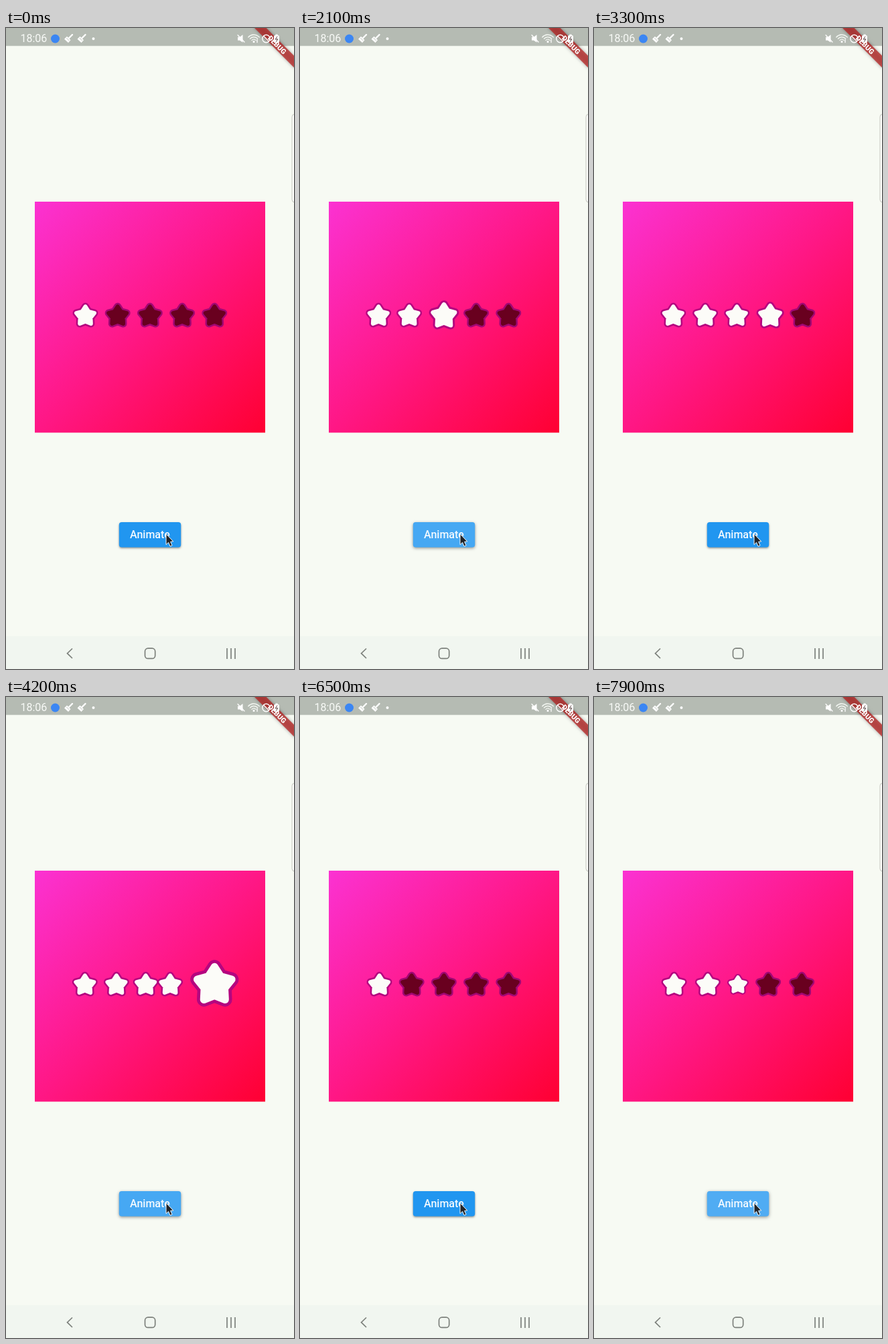
Animation, 430 px wide and 956 px high, one loop 8 s. Source, as an HTML page with a canvas:

```html
<!DOCTYPE html>
<html lang="en">
<head>
<meta charset="utf-8">
<title>Star rating</title>
<style>
html, body { margin: 0; width: 100%; height: 100%; overflow: hidden; background: #f7faf3; }
canvas { display: block; width: 430px; height: 956px; }
</style>
</head>
<body>
<canvas id="stage" width="430" height="956"></canvas>
<script>
const ctx = document.getElementById('stage').getContext('2d');
const W = 430, H = 956, LOOP = 8000, STEP = 100;
const FONT = 'Roboto, sans-serif';

// [time of press, new rating]
const presses = [[700, 2], [1700, 3], [2600, 4], [3800, 5], [5600, 1], [6700, 2], [7700, 3]];
const peaks = [1.1, 1.18, 1.18, 1.45, 1.9];
const ends = [600, 600, 600, 900, 1300];
const falloff = [0, 1, 0.35, 0.1, 0.04];

function tween(keys, t) {
  if (t <= keys[0][0]) return keys[0][1];
  for (let i = 1; i < keys.length; i++) {
    const [t0, a] = keys[i - 1], [t1, b] = keys[i];
    if (t < t1) {
      const k = (t - t0) / (t1 - t0);
      return a + (b - a) * k * k * (3 - 2 * k);
    }
  }
  return keys[keys.length - 1][1];
}

function popScale(rating, t) {
  const peak = peaks[rating - 1], end = ends[rating - 1];
  const dip = rating === 1 ? 0.85 : 0.65;
  return tween([[-100, 1], [100, dip], [200, Math.max(dip, 0.84)], [400, peak],
    [(400 + end) / 2, 1 + (peak - 1) * 0.2], [end, 1]], t);
}

function pushRight(rating, t) {
  const peak = (peaks[rating - 1] - 1) * 12;
  return tween([[-100, 0], [100, -6], [200, -3], [300, peak], [400, 0]], t);
}

function fillRect(x, y, w, h, color) {
  ctx.fillStyle = color;
  ctx.fillRect(x, y, w, h);
}

function roundRect(x, y, w, h, r) {
  ctx.beginPath();
  ctx.roundRect(x, y, w, h, r);
}

function poly(points, close) {
  ctx.beginPath();
  points.forEach(([x, y]) => ctx.lineTo(x, y));
  if (close) ctx.closePath();
}

function stroke(color, width) {
  ctx.strokeStyle = color;
  ctx.lineWidth = width;
  ctx.stroke();
}

function disc(x, y, r, color) {
  ctx.beginPath();
  ctx.arc(x, y, r, 0, Math.PI * 2);
  ctx.fillStyle = color;
  ctx.fill();
}

function text(str, x, y, font, color, align) {
  ctx.font = font + ' ' + FONT;
  ctx.fillStyle = color;
  ctx.textAlign = align;
  ctx.fillText(str, x, y);
}

function drawStar(x, scale, lit) {
  ctx.save();
  ctx.translate(x, 429.5);
  ctx.scale(scale, scale);
  ctx.lineJoin = 'round';
  const points = [];
  for (let i = 0; i < 10; i++) {
    const a = -Math.PI / 2 + i * Math.PI / 5, r = i % 2 ? 8.3 : 14.2;
    points.push([r * Math.cos(a), r * Math.sin(a)]);
  }
  poly(points, true);
  stroke(lit ? '#b4057f' : '#a00774', 11);
  stroke(lit ? '#fcfcf8' : '#69001f', 6);
  ctx.fillStyle = lit ? '#fcfcf8' : '#69001f';
  ctx.fill();
  ctx.restore();
}

function drawStars(rating, before, t) {
  const scale = popScale(rating, t), reset = rating === 1;
  const right = pushRight(rating, t);
  const shown = t >= 100 ? rating : before;
  const order = [1, 2, 3, 4, 5].filter(i => i !== rating).concat(rating);
  for (const i of order) {
    const d = i - rating;
    let x = 118.5 + (i - 1) * 48.2;
    if (!reset && d < 0) x -= (scale - 1) * 20 * falloff[-d];
    if (!reset && d > 0) x += right * falloff[d];
    drawStar(x, d === 0 || reset ? scale : 1, i <= shown);
  }
}

function drawPanel() {
  const g = ctx.createLinearGradient(43, 259, 387, 604);
  g.addColorStop(0, '#fb32d2');
  g.addColorStop(0.5, '#ff1785');
  g.addColorStop(1, '#ff0032');
  fillRect(43, 259, 344, 344.5, g);
}

function drawButton(t) {
  const glow = tween([[-100, 0], [100, 0.2], [200, 0.21], [400, 0.17], [600, 0]], t);
  ctx.save();
  ctx.shadowColor = 'rgba(0,0,0,.4)';
  ctx.shadowBlur = 3 + glow * 10;
  ctx.shadowOffsetY = 1.5;
  roundRect(168.8, 737, 92.4, 37.5, 4);
  ctx.fillStyle = '#2196f0';
  ctx.fill();
  ctx.restore();
  if (glow > 0) {
    ctx.save();
    roundRect(168.8, 737, 92.4, 37.5, 4);
    ctx.clip();
    disc(239, 755, 40 + Math.max(0, t) * 0.3, `rgba(255,255,255,${glow})`);
    ctx.restore();
  }
  text('Animate', 215, 761, '500 16px', '#f6fbff', 'center');
}

function drawCursor() {
  poly([[239, 754.5], [239, 770.5], [242.6, 767.2], [245, 773], [248, 771.8],
    [245.6, 766.2], [249.8, 765.8]], true);
  ctx.fillStyle = '#20242a';
  ctx.fill();
  ctx.lineJoin = 'miter';
  stroke('#f4f7fa', 1);
}

function drawBrush(x) {
  poly([[x + 6, 10], [x + 1, 15]]);
  stroke('#fff', 2.4);
  poly([[x - 2, 12.5], [x + 3.5, 18], [x, 22], [x - 6, 16.5]], true);
  ctx.fillStyle = '#fff';
  ctx.fill();
  poly([[x - 2.6, 15], [x + 1, 18.6]]);
  stroke('#b5bbb3', 0.9);
}

function drawStatusIcons() {
  ctx.lineCap = 'round';
  text('18:06', 21.5, 21.3, '400 16px', '#f8faf7', 'left');
  disc(73.5, 16, 6.5, '#3b86f3');
  drawBrush(93);
  drawBrush(112.5);
  disc(130.5, 16, 2, '#fff');

  // muted speaker
  poly([[346, 13.5], [349, 13.5], [353.5, 10], [353.5, 21.5], [349, 18.5], [346, 18.5]], true);
  ctx.fillStyle = '#fff';
  ctx.fill();
  poly([[346, 10.5], [356, 21]]);
  stroke('#fff', 1.3);

  // wireless arcs
  for (const r of [4, 7.5, 11]) {
    ctx.beginPath();
    ctx.arc(370, 21, r, -Math.PI * 0.77, -Math.PI * 0.23);
    stroke('#f3f6f1', 1.4);
  }
  disc(370, 20.5, 1.5, '#fff');
  poly([[375, 17.5], [375, 21.5]]);
  stroke('#fff', 1.3);

  // blocked sign
  ctx.beginPath();
  ctx.arc(388.5, 16, 5.7, 0, Math.PI * 2);
  stroke('#fff', 1.4);
  poly([[384.6, 12], [392.5, 20]]);
  stroke('#fff', 1.4);

  // battery
  roundRect(400, 11, 8, 11, 1.5);
  ctx.fillStyle = '#fff';
  ctx.fill();
  fillRect(402.3, 9.5, 3.4, 2, '#fff');
  poly([[404.8, 12.8], [402.2, 17], [405.8, 16.5], [403.5, 20.3]]);
  stroke('#5b4545', 1);
  ctx.lineCap = 'butt';
}

function drawBanner() {
  ctx.save();
  ctx.translate(W, 0);
  ctx.rotate(Math.PI / 4);
  ctx.shadowColor = 'rgba(0,0,0,.45)';
  ctx.shadowBlur = 5;
  fillRect(-43, 29.2, 86, 12.5, 'rgba(183,28,28,.72)');
  ctx.shadowBlur = 0;
  text('DEBUG', 0, 39.3, '900 10.6px', '#fff', 'center');
  ctx.restore();
}

function drawNav() {
  fillRect(0, 907, W, H - 907, '#f1f6f0');
  ctx.lineJoin = 'miter';
  poly([[99, 925.5], [91.5, 932.7], [99, 940]]);
  stroke('#7d817c', 1.7);
  roundRect(207.5, 925.2, 15.2, 15.2, 4.5);
  stroke('#7d817c', 1.7);
  for (const x of [330, 336, 342]) {
    poly([[x, 925], [x, 941]]);
    stroke('#7d817c', 1.7);
  }
}

function drawHandle() {
  roundRect(427, 128.5, 12, 131.5, 4);
  ctx.fillStyle = '#fcfdf9';
  ctx.fill();
  stroke('#c4c6bf', 1);
}

function render(time) {
  let rating = 1, before = 1, t = 5000;
  for (const [at, next] of presses) {
    if (time < at) break;
    before = rating;
    rating = next;
    t = time - at;
  }
  fillRect(0, 0, W, H, '#f7faf3');
  fillRect(0, 0, W, 26.7, '#b5bbb3');
  drawPanel();
  drawStars(rating, before, t);
  drawButton(t);
  drawCursor();
  drawHandle();
  drawNav();
  drawBanner();
  drawStatusIcons();
}

const start = performance.now();
function frame() {
  const time = (performance.now() - start) % LOOP;
  render(Math.floor(time / STEP) * STEP);
  requestAnimationFrame(frame);
}
frame();
</script>
</body>
</html>
```
